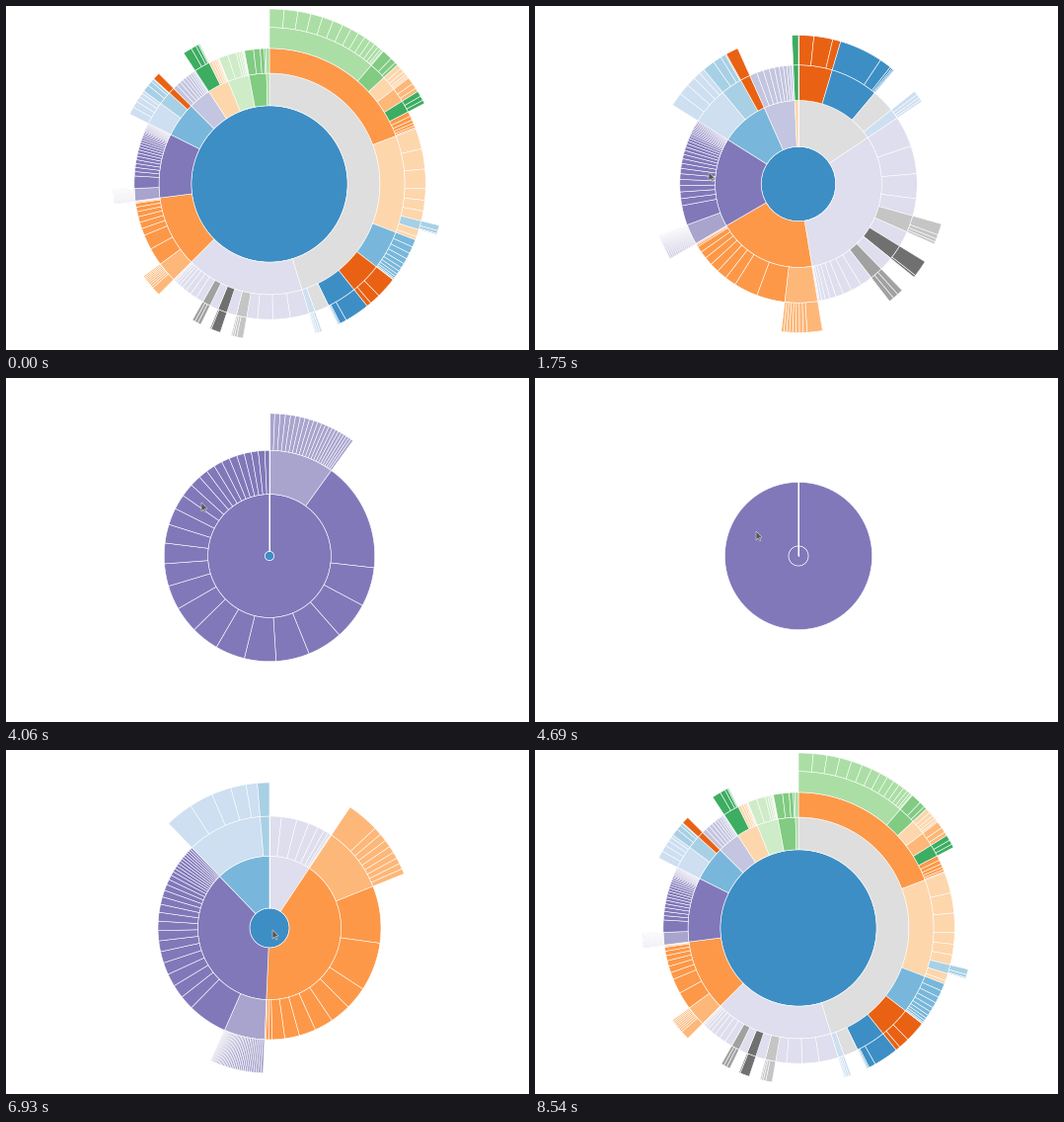
These frames come from a looping animation (530 by 348 pixels, 9.31 s). A matplotlib script:

```python
import numpy as np
import matplotlib.pyplot as plt
from matplotlib.animation import FuncAnimation
from matplotlib.collections import PolyCollection
from matplotlib.patches import Circle, Polygon

W, H, DPI = 530, 348, 100
CX, CY, R, HOLE = 267, 180, 177, 10.1
STEP, LOOP = 70, 9310
DEPTH = 5
LINE = .55 * 72 / DPI


def ramp(total, n, low, bend=1.0):
    """n falling sizes with the given sum; low is last/first."""
    v = low + (1 - low) * np.linspace(1, 0, n) ** bend
    return list(v / v.sum() * total)


# Package sizes in kB: a number is a leaf, a (name, children) pair is a group.
TREE = ("flare", [
    ("analytics", [
        ("cluster", ramp(15.2, 4, .1)),
        ("graph", ramp(26.4, 5, .4)),
        ("optimization", [7.1])]),
    ("animate", [
        ("interpolate", [8.7] + ramp(14.4, 8, .65)),
        *ramp(37, 2, .85), *ramp(37.3, 6, .55), *ramp(2.6, 3, .4)]),
    ("data", [("converters", ramp(18.3, 5, .07, 2)), *ramp(11.9, 6, .18)]),
    ("display", ramp(24.3, 4, .17)),
    ("flex", [4.1]),
    ("physics", ramp(20.5, 2, .95) + ramp(9.4, 6, .11)),
    ("query", [
        ("methods", ramp(14.3, 32, .35)),
        13.9, *ramp(51, 16, .29), *ramp(10.5, 11, .64)]),
    ("scale", ramp(31.3, 10, .2)),
    ("util", [
        ("heap", ramp(10.6, 2, .13)),
        ("math", ramp(9.3, 3, .84)),
        ("palette", [6.4] + ramp(5.5, 3, .55)),
        *ramp(58.9, 3, .8), *ramp(74.4, 13, .03, 1.25)]),
    ("vis", [
        ("axis", [24.6, 6.7] + ramp(2.6, 3, .5)),
        ("controls", ramp(44.6, 11, .09)),
        ("data", [
            ("render", ramp(8.9, 4, .06, 1.6)),
            *ramp(59.7, 3, .94), *ramp(31.6, 3, .88), *ramp(10.4, 2, .46)]),
        ("events", ramp(7, 4, .5)),
        ("legend", ramp(36, 3, .22, 1.4)),
        ("operator", [
            ("distortion", ramp(14.2, 3, .55)),
            ("encoder", ramp(14.9, 5, .4)),
            ("filter", ramp(11.9, 3, .65)),
            ("label", ramp(17.1, 3, .3, 1.5)),
            ("layout", ramp(108.1, 15, .07, .9)),
            *ramp(17.8, 6, .25)]),
        16.5]),
])


def size(node):
    return sum(map(size, node[1])) if isinstance(node, tuple) else node


def number_groups(node, order):
    """Colour index of each group name, in order of first appearance."""
    if isinstance(node, tuple):
        order.setdefault(node[0], len(order))
        for kid in node[1]:
            number_groups(kid, order)
    return order


def tone(index):
    return np.array(plt.cm.tab20c(index % 20)[:3]) ** .87


GROUPS = number_groups(TREE, {})
TOTAL = size(TREE)
arcs, colors, spans = [], [], {}


def place(node, x, depth, owner):
    dx = size(node) / TOTAL
    kids = []
    if isinstance(node, tuple):
        owner, kids = node
        spans.setdefault(owner, (x, x + dx))
    arcs.append((x, x + dx, depth / DEPTH, (depth + 1) / DEPTH))
    colors.append(tone(GROUPS[owner]))
    for kid in sorted(kids, key=size, reverse=True):
        place(kid, x, depth + 1, owner)
        x += size(kid) / TOTAL


place(TREE, 0, 0, "")
X0, X1, Y0, Y1 = np.array(arcs).T

# The clicked leaf lies at this share of the query span
pick = spans["query"][0] + .857 * np.diff(spans["query"])[0]
leaf = np.flatnonzero((X0 <= pick) & (pick < X1) & np.isclose(Y0, 2 / DEPTH))[0]

# A view is: x domain start and end, y domain start, inner radius.
ROOT = np.array([0, 1, 0, 0])
QUERY = np.array([*spans["query"], 1 / DEPTH, HOLE])
LEAF = np.array([X0[leaf], X1[leaf], 2 / DEPTH, HOLE])
ZOOM_MS = 850
ZOOMS = [(1324, QUERY), (3830, LEAF), (5304, QUERY), (6630, ROOT)]


def ease(p):
    p = min(max(p, 0), 1)
    return 4 * p ** 3 if p < .5 else 1 - 4 * (1 - p) ** 3


def view_at(t):
    view = ROOT
    for start, goal in ZOOMS:
        view = view + (goal - view) * ease((t - start) / ZOOM_MS)
    return view


SWEEP = np.linspace(0, 1, 90)


def wedges(view):
    a, b, y, hole = view

    def angle(x):
        return 2 * np.pi * np.clip((x - a) / (b - a), 0, 1)[:, None]

    def radius(d):
        s = np.sqrt(y)
        return np.maximum(0, hole + (R - hole) * (np.sqrt(d) - s) / (1 - s))[:, None]

    a0, a1, r0, r1 = angle(X0), angle(X1), radius(Y0), radius(Y1)
    th = a0 + (a1 - a0) * SWEEP
    th = np.hstack([th, th[:, ::-1]])
    r = np.hstack([np.repeat(r1, SWEEP.size, 1), np.repeat(r0, SWEEP.size, 1)])
    return np.dstack([CX + r * np.sin(th), CY - r * np.cos(th)]), r1[0, 0]


# Pointer rests: arrival, departure, x, y
RESTS = [(70, 70, 490, 250), (910, 1960, 176, 168), (2600, 3080, 190, 168),
         (3640, 4200, 198, 126), (4690, 4690, 224, 155), (5110, 5810, 265, 179),
         (6440, 7420, 270, 182), (8050, 8050, 484, 250)]
TIMES = [t for rest in RESTS for t in rest[:2]]
SPOTS = np.repeat([rest[2:] for rest in RESTS], 2, axis=0)
ARROW = np.array([(0, 0), (0, 9), (2, 7), (4, 10), (5, 9.5), (3.5, 6.5), (6, 6)])

fig = plt.figure(figsize=(W / DPI, H / DPI), dpi=DPI, facecolor="white")
ax = fig.add_axes([0, 0, 1, 1])
ax.set(xlim=(0, W), ylim=(H, 0))
ax.axis("off")

disc = Circle((CX, CY), R, fc=colors[0], ec="white", lw=LINE, zorder=1)
rings = PolyCollection([], facecolors=colors[1:], edgecolors="white",
                       linewidths=LINE, zorder=2)
pointer = Polygon(ARROW, fc="#555555", ec="#d8d8d8", lw=LINE, zorder=3)
ax.add_patch(disc)
ax.add_collection(rings, autolim=False)
ax.add_patch(pointer)


def draw(i):
    t = i * STEP
    verts, core = wedges(view_at(t))
    rings.set_verts(verts[1:])
    disc.set_radius(core)
    disc.set_visible(core > 0)
    pointer.set_visible(TIMES[0] <= t <= TIMES[-1])
    pointer.set_xy(ARROW + [np.interp(t, TIMES, axis) for axis in SPOTS.T])
    return disc, rings, pointer


anim = FuncAnimation(fig, draw, frames=LOOP // STEP, interval=STEP,
                     repeat=True, repeat_delay=0, blit=False)
plt.show()
```
